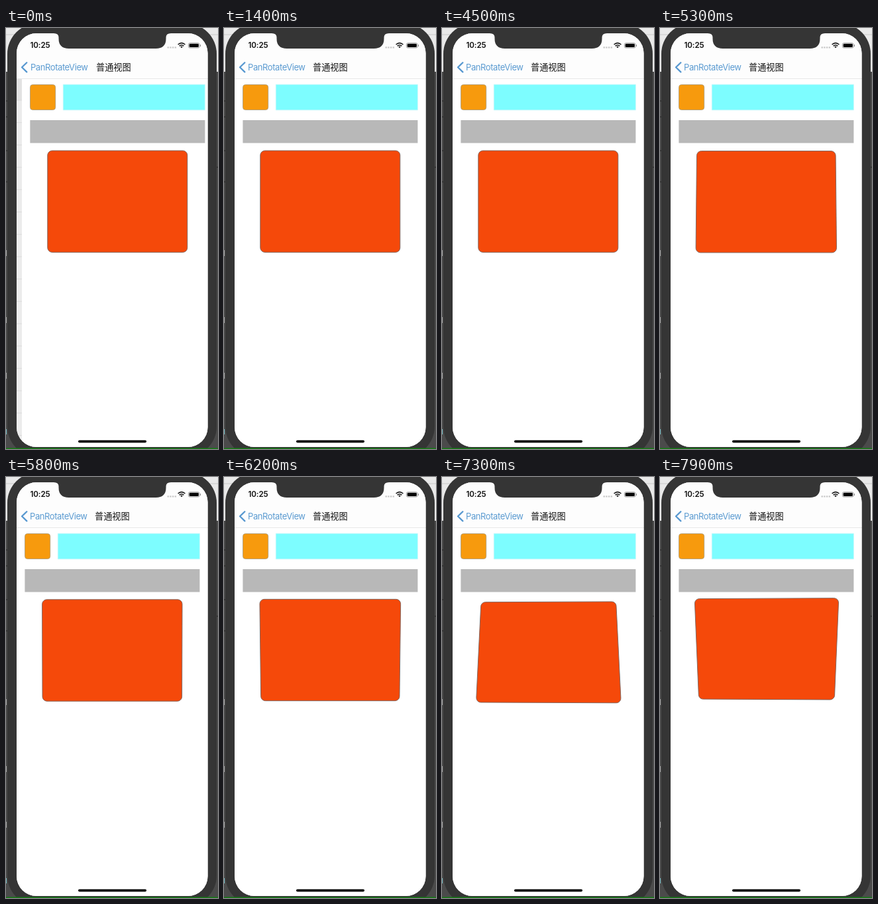
An HTML page that plays this animation: 320 px wide and 635 px high, repeating every 8 s.

```html
<!DOCTYPE html>
<html lang="zh">
<head>
<meta charset="utf-8">
<title>PanRotateView</title>
<style>
html, body { margin: 0; width: 100%; height: 100%; overflow: hidden; background: #4b4b4b; }
svg { display: block; width: 100%; height: 100%; }
text { font-family: Inter, Roboto, sans-serif; }
.title { font-family: "Noto Sans CJK SC", "Noto Sans CJK", "Noto Sans CJK JP", sans-serif; font-size: 13.2px; font-weight: 500; }
</style>
</head>
<body>
<svg viewBox="0 0 320 635">
  <defs>
    <clipPath id="screen"><rect x="16" y="8" width="288.5" height="624" rx="30"/></clipPath>
  </defs>

  <!-- desktop and phone body -->
  <rect width="320" height="635" fill="#4b4b4b"/>
  <rect width="320" height="66" fill="#e9e9e9"/>
  <path d="M0 10H320" stroke="#c8c8c8"/>
  <path d="M0 110H2M0 134H2M0 185H2M0 232H2M318 210H320" stroke="#222"/>
  <path d="M0 335V344M0 436V445M0 520V529" stroke="#aaa" stroke-width="2"/>
  <path d="M0 605V613" stroke="#7cc4cc" stroke-width="2"/>
  <rect x="2" y="-7" width="316" height="654" rx="46" fill="#353535"/>

  <g clip-path="url(#screen)">
    <rect x="16" y="8" width="289" height="624" fill="#fff"/>
    <g id="under">
      <rect x="16" y="77" width="20" height="555" fill="#ececec"/>
      <rect x="16" y="77" width="20" height="32" fill="#e2e2e2"/>
      <path id="rows" stroke="#d6d6d6" stroke-width=".8"/>
    </g>
    <g id="page">
      <rect x="16" y="77" width="289" height="555" fill="#fff"/>
      <rect x="28.5" y="85.5" width="38.2" height="38" rx="4" fill="#f79a0d" stroke="#a89878" stroke-width=".8"/>
      <path id="cyan" fill="#7dfdff" stroke="#c4f8fa" stroke-width=".8"/>
      <path id="gray" fill="#b8b8b8"/>
      <path id="card" fill="#f5490a" stroke="#75605c" stroke-width=".9"/>
    </g>
    <rect x="16" y="8" width="289" height="68" fill="#fdfdfd"/>
    <path d="M16 76.5H305" stroke="#e3e3e3" stroke-width=".8"/>
    <path d="M31.3 52.2L24 59.3L31.3 66.4" fill="none" stroke="#5798d0" stroke-width="2.3" stroke-linecap="round" stroke-linejoin="round"/>
    <text id="back" x="36" y="64" font-size="13" letter-spacing="-.42" fill="#5b9bd1">PanRotateView</text>
    <text id="title" class="title" x="134" y="64" fill="#111">普通视图</text>
    <text x="36.5" y="30.2" font-size="11.6" font-weight="600" letter-spacing="-.1" fill="#111">10:25</text>
    <path d="M243.5 29.3H257" stroke="#c9c9c9" stroke-width="2.2" stroke-dasharray="2.4 1.3"/>
    <g fill="none" stroke="#111" stroke-width="1.6">
      <path d="M259.6 25Q265 20.4 270.4 25M261.6 27.2Q265 24.3 268.4 27.2"/>
      <path d="M263.5 28.3Q265 27.3 266.5 28.3L265 30Z" fill="#111" stroke-width=".4"/>
    </g>
    <rect x="275.4" y="22.7" width="16.6" height="7.4" rx="2.2" fill="#fff" stroke="#8a8a8a" stroke-width=".8"/>
    <rect x="276.6" y="23.8" width="14.2" height="5.2" rx="1.3" fill="#050505"/>
    <path d="M293.4 25V28" stroke="#8a8a8a"/>
    <rect x="109" y="621.7" width="103" height="3.8" rx="1.9" fill="#050505"/>
  </g>

  <path d="M72 7H249V8Q241.5 8 241.5 14V16Q241.5 31 226 31H95Q79.5 31 79.5 16V14Q79.5 8 72 8Z" fill="#353535"/>
  <path d="M0 634.3H320" stroke="#147a14" stroke-width="1.4"/>
</svg>
<script>
const $ = id => document.getElementById(id);
const LOOP = 8000, DEPTH = 300;

// Outline of a rounded box, relative to its centre.
function outline(w, h, r) {
  const pts = [];
  for (let q = 0; q < 4; q++) {
    const sx = q === 0 || q === 3 ? 1 : -1, sy = q < 2 ? 1 : -1;
    for (let i = 0; i <= 6; i++) {
      const a = (q + i / 6) * Math.PI / 2;
      pts.push([sx * (w / 2 - r) + r * Math.cos(a), sy * (h / 2 - r) + r * Math.sin(a)]);
    }
  }
  return pts;
}

function panel(id, x, y, w, h, r) {
  return { el: $(id), cx: x + w / 2, cy: y + h / 2, pts: outline(w, h, r) };
}

// Rotate about the x and y axes, then project.
function tilt(p, ax, ay = 0) {
  const d = p.pts.map(([u, v]) => {
    const z = v * Math.sin(ax) + u * Math.sin(ay);
    const s = 1 / (1 - z / DEPTH);
    return (p.cx + u * Math.cos(ay) * s).toFixed(2) + " " + (p.cy + v * Math.cos(ax) * s).toFixed(2);
  });
  p.el.setAttribute("d", "M" + d.join("L") + "Z");
}

const cyan = panel("cyan", 78.3, 85.2, 214, 38.6, .01);
const gray = panel("gray", 28.4, 139, 264, 34.5, .01);
const card = panel("card", 54.8, 185, 211, 153.3, 7);

let rows = "";
for (let y = 109; y < 632; y += 33.7) rows += `M16 ${y}H36`;
$("rows").setAttribute("d", rows);

// [time, x angle, y angle]
const poses = [[4500, 0, 0], [5300, .028, 0], [6200, -.034, 0], [7300, .14, .015], [7900, -.12, .018], [8000, -.12, .018]];

function poseAt(t) {
  if (t <= poses[0][0]) return [0, 0];
  const i = poses.findIndex(p => t <= p[0]);
  const a = poses[i - 1], b = poses[i];
  const k = (1 - Math.cos(Math.PI * (t - a[0]) / (b[0] - a[0]))) / 2;
  return [a[1] + (b[1] - a[1]) * k, a[2] + (b[2] - a[2]) * k];
}

// One swing there and back between two times.
const swing = (t, from, to) => t > from && t < to ? Math.sin(2 * Math.PI * (t - from) / (to - from)) : 0;

function draw(t) {
  const slide = t < 400 ? 8 * (1 - t / 400) ** 2 : 0;
  $("page").setAttribute("transform", `translate(${slide})`);
  $("under").setAttribute("visibility", slide ? "visible" : "hidden");
  $("back").setAttribute("x", 36 + slide / 8);
  $("title").setAttribute("x", 134 + slide / 4);
  tilt(cyan, .25 * swing(t, 1500, 2100));
  tilt(gray, .25 * swing(t, 3500, 4450));
  tilt(card, ...poseAt(t));
}

const start = performance.now();
function tick() {
  draw((performance.now() - start) % LOOP);
  requestAnimationFrame(tick);
}
tick();
</script>
</body>
</html>
```
